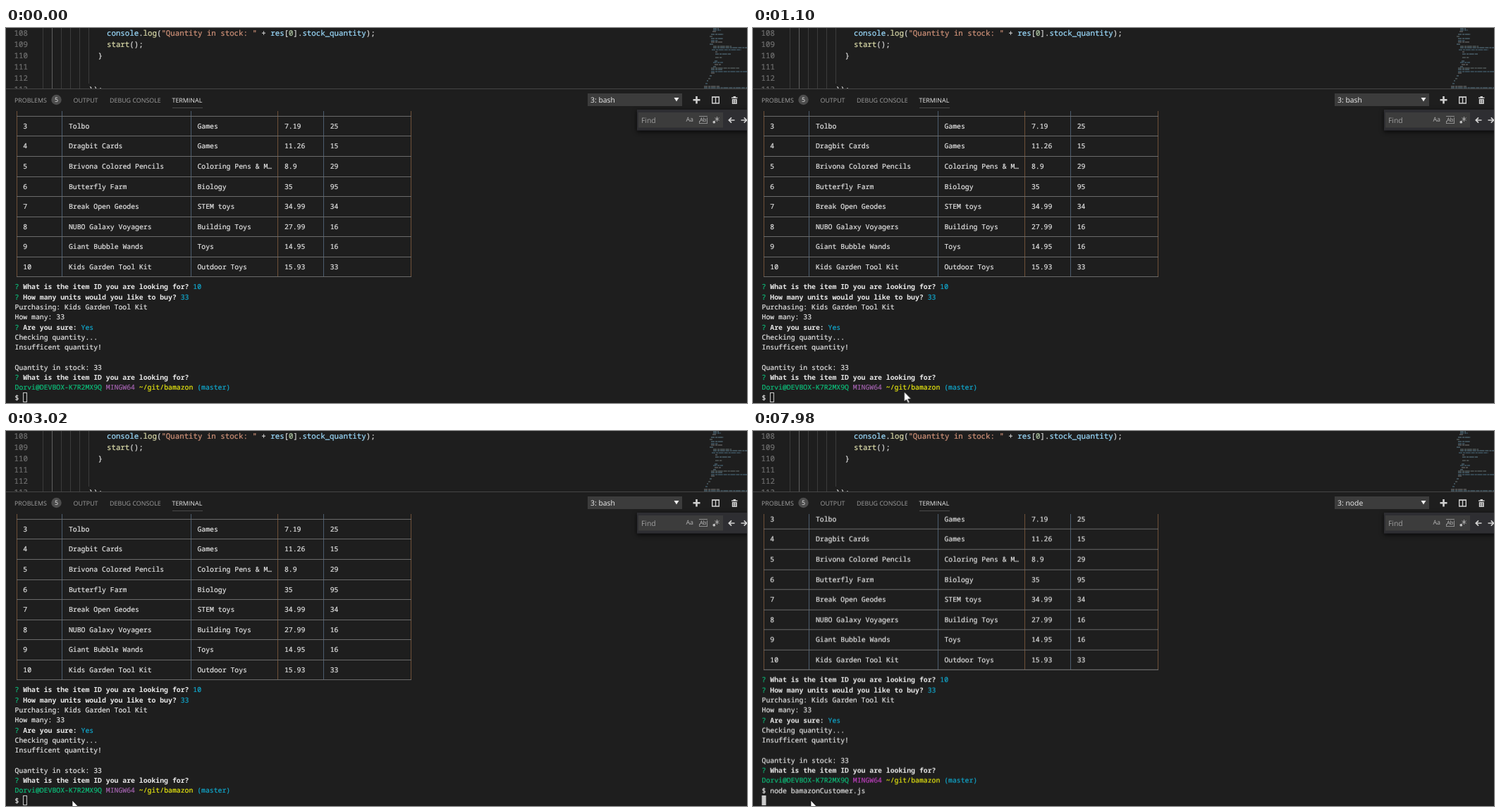
Animation of 1051 by 533 pixels, one loop 8 s. Source, as an HTML page:

```html
<!DOCTYPE html>
<html lang="en">
<head>
<meta charset="utf-8">
<title>Terminal session</title>
<style>
html, body { margin: 0; width: 100%; height: 100%; overflow: hidden; background: #1e1e1e; }
svg { display: block; width: 1051px; height: 533px; }
text { white-space: pre; text-rendering: geometricPrecision; }
.code, .term { fill: currentColor; }
.code text, .term text, .code tspan, .term tspan { fill: currentColor; stroke: currentColor; stroke-width: .22px; }
.code { font: 10.76px "Noto Sans Mono", "DejaVu Sans Mono", monospace; color: #d8d8d8; }
.term { font: 9.807px "Noto Sans Mono", "DejaVu Sans Mono", monospace; color: #e2e2e2; }
.tab { font: 8.9px "Open Sans", "Noto Sans", sans-serif; fill: #a0a0a0; }
.ui { font: 500 10.4px "Open Sans", "Noto Sans", sans-serif; fill: #f0f0f0; }
.dim { color: #707070; }
.var { color: #9cdcfe; }
.fn { color: #dcdcaa; }
.str { color: #ce9178; }
.num { color: #b5cea8; }
.green { color: #0dbc79; }
.cyan { color: #11a8cd; }
.yellow { color: #e5e510; }
.bold { font-weight: 700; color: #e8e8e8; }
.term .bold { stroke-width: 0; }
#table { shape-rendering: crispEdges; }
.shell { animation: shell 8s step-end infinite; }
.scroll { animation: scroll 8s step-end infinite; }
.typed { animation: typed 8s step-end infinite; }
.before { animation: before 8s step-end infinite; }
.after { animation: after 8s step-end infinite; }
.hollow { animation: hollow 8s step-end infinite; }
.block { animation: block 8s step-end infinite; }
.mouse { animation: mouse 8s step-end infinite; }
@keyframes shell { 0% { color: #a262ad; } 99.75%, 100% { color: #bc3fbc; } }
@keyframes scroll { 0% { transform: none; } 99.75%, 100% { transform: translateY(-14.286px); } }
@keyframes typed { 0% { opacity: 0; } 83.25%, 100% { opacity: 1; } }
@keyframes before { 0% { opacity: 1; } 99.75%, 100% { opacity: 0; } }
@keyframes after { 0% { opacity: 0; } 99.75%, 100% { opacity: 1; } }
@keyframes hollow { 0% { opacity: 1; } 41.75%, 100% { opacity: 0; } }
@keyframes block {
  0% { opacity: 0; transform: translateX(24.3px); }
  41.75% { opacity: 1; transform: translateX(24.3px); }
  83.25% { opacity: 1; transform: translateX(165.5px); }
  99.75%, 100% { opacity: 1; transform: translateX(12.5px); }
}
@keyframes mouse {
  0% { transform: translate(571px, 560px); }
  2.125% { transform: translate(571px, 528px); }
  2.875% { transform: translate(441px, 528px); }
  5.875% { transform: translate(380px, 522px); }
  6.875% { transform: translate(310px, 515px); }
  7.875% { transform: translate(258px, 511px); }
  10.75% { transform: translate(254px, 511px); }
  11.625% { transform: translate(241px, 513px); }
  12.75% { transform: translate(226px, 515px); }
  13.75% { transform: translate(214.5px, 517px); }
  17.625% { transform: translate(206px, 518px); }
  18.625% { transform: translate(196px, 520px); }
  19.625% { transform: translate(185px, 523px); }
  20.625% { transform: translate(177px, 525px); }
  22.375% { transform: translate(176px, 525px); }
  32.125% { transform: translate(161px, 525px); }
  32.875% { transform: translate(138px, 525px); }
  34% { transform: translate(116px, 525px); }
  36.75% { transform: translate(106px, 525px); }
  37.75% { transform: translate(94px, 525px); }
  38.875% { transform: translate(82px, 525px); }
  40.75% { transform: translate(82px, 514px); }
  41.75%, 100% { transform: translate(82px, 525px); }
}
</style>
</head>
<body>
<svg viewBox="0 0 1051 533" xmlns="http://www.w3.org/2000/svg">
  <defs>
    <clipPath id="editorClip"><rect width="1051" height="86"/></clipPath>
    <clipPath id="termClip"><rect y="118" width="1051" height="415"/></clipPath>
    <filter id="shadow" x="-10%" y="-40%" width="120%" height="200%">
      <feDropShadow dx="0" dy="2" stdDeviation="3" flood-color="#000" flood-opacity=".8"/>
    </filter>
  </defs>
  <rect width="1051" height="533" fill="#1e1e1e"/>

  <g clip-path="url(#editorClip)">
    <g id="guides"></g>
    <g id="code" class="code"></g>
    <g id="minimap" stroke-opacity=".5"></g>
  </g>

  <path d="M0 86.5H1051" stroke="#454545"/>
  <g class="tab">
    <text x="12" y="105.5">PROBLEMS</text>
    <circle cx="71.5" cy="102" r="7.2" fill="#4d4d4d"/>
    <text x="71.5" y="105.3" text-anchor="middle" fill="#eee">5</text>
    <text x="95.5" y="105.5">OUTPUT</text>
    <text x="147" y="105.5">DEBUG CONSOLE</text>
    <text x="235.5" y="105.5" fill="#ececec">TERMINAL</text>
  </g>
  <path d="M236 113.5H279" stroke="#4a4a4a"/>

  <rect x="825" y="93" width="134" height="18" fill="#3c3c3c"/>
  <text class="ui before" x="829" y="106.2">3: bash</text>
  <text class="ui after" x="829" y="106.2">3: node</text>
  <path d="M947.5 99H954.5L951 104.5Z" fill="#f0f0f0"/>
  <path d="M979.5 97V107.5M974.5 102.2H984.5" stroke="#d0d0d0" stroke-width="2.6"/>
  <path d="M1001.7 98H1011.3V107H1001.7ZM1006.5 98V107M1001 98.3H1012" fill="none" stroke="#d0d0d0" stroke-width="1.4"/>
  <path d="M1029 98.5H1037.5V100H1029ZM1031.5 97H1035V98.5H1031.5ZM1029.8 101H1036.8V108H1029.8Z" fill="#d0d0d0"/>
  <path d="M1032 102V107M1034.6 102V107" stroke="#1e1e1e" stroke-width=".7"/>

  <g clip-path="url(#termClip)">
    <g class="scroll">
      <g id="table"></g>
      <g id="lines" class="term"></g>
    </g>
    <rect class="hollow" x="24.5" y="518.5" width="5" height="13" fill="none" stroke="#c8c8c8"/>
    <rect class="block" y="518" width="6" height="14" fill="#cccccc"/>
  </g>

  <rect x="895" y="116" width="160" height="29.5" fill="#2d2d30" filter="url(#shadow)"/>
  <rect x="897" y="120" width="120" height="21.5" fill="#3c3c3c"/>
  <text x="901" y="135" class="ui" style="fill:#a0a0a0">Find</text>
  <g class="tab">
    <text x="964.5" y="133.3" fill="#b5b5b5">Aa</text>
    <text x="984" y="133.3" fill="#c5c5c5" font-size="7.6">Abl</text>
    <path d="M983 125.5H995M983 135.5H995M983.5 132V135.5M994.5 132V135.5" stroke="#a5a5a5" fill="none" stroke-width=".8"/>
    <path d="M1003 132.5H1005.5V135H1003ZM1008.5 126V133M1005.5 127.7L1011.5 131.3M1011.5 127.7L1005.5 131.3" fill="#c5c5c5" stroke="#c5c5c5" stroke-width=".8"/>
  </g>
  <path d="M1033.5 131H1025.5M1029 127.3L1025.3 131L1029 134.7M1042.5 131H1050M1046.8 127.3L1050.5 131L1046.8 134.7" fill="none" stroke="#d4d4d4" stroke-width="1.7"/>

  <path class="mouse" d="M0 0V14L3.1 11.2L5.3 16L7.5 15L5.3 10.3H9.8Z" fill="#fff" stroke="#111" stroke-width=".7"/>
</svg>
<script>
const CHAR = 5.884, LINE = 14.286, LEFT = 12.5, BOTTOM = 525;
const fill = (id, markup) => { document.getElementById(id).innerHTML = markup; };
const escapeText = s => s.replace(/&/g, '&amp;').replace(/</g, '&lt;');
const span = ([text, cls = '']) => `<tspan class="${cls}">${escapeText(text)}</tspan>`;
const textAt = (x, y, parts) => `<text xml:space="preserve" x="${x}" y="${y}">${parts.map(span).join('')}</text>`;
const stroke = (d, color, extra = '') => `<path d="${d}" stroke="${color}" ${extra}/>`;

// Editor
fill('guides', Array.from({ length: 6 }, (_, i) =>
  stroke(`M${52.5 + 13 * i} 0V${i === 5 ? 79 : 86}`, i === 1 ? '#606060' : '#3c3c3c')).join(''));

const source = [
  [143, [['console', 'var'], ['.'], ['log', 'fn'], ['('], ['"Quantity in stock: "', 'str'], [' + '],
    ['res', 'var'], ['['], ['0', 'num'], ['].'], ['stock_quantity', 'var'], [');']]],
  [143, [['start', 'fn'], ['();']]],
  [130.5, [['}']]],
  [0, []],
  [0, []],
  [117.5, [['});']]]
];
fill('code', source.map(([x, parts], i) => {
  const y = 10.8 + 16 * i;
  return textAt(11.5, y, [[String(108 + i), 'dim']]) + textAt(x, y, parts);
}).join(''));

// Minimap rows: x, y, width
const mini = [
  [1003, 1, 8], [1003, 3, 11], [1002, 5, 5], [1000, 9, 18], [998, 12, 4], [1000, 15, 17], [1000, 18, 10],
  [1000, 20, 16], [998, 23, 5], [1003, 26, 26], [1003, 28, 48], [1001, 31, 42], [1006, 34, 3], [1006, 37, 22],
  [1006, 42, 10], [1005, 47, 4], [1003, 49, 14], [1005, 52, 9], [1003, 55, 4], [1000, 57, 40], [1000, 59, 16],
  [1000, 62, 51], [1000, 64, 5], [998, 68, 3], [996, 72, 3], [994, 75, 2], [992, 79, 3], [990, 83, 22], [990, 85, 61]
];
const miniColors = ['#9cdcfe', '#7cc4ee', '#d4d4d4', '#9cdcfe', '#b0c8c8'];
fill('minimap', mini.map(([x, y, w], i) =>
  stroke(`M${x} ${y}h${w}`, miniColors[i % 5], 'stroke-dasharray="5 1 3 .7 7 1"')).join(''));

// Terminal: rows are counted upwards from the bottom line
const rowY = row => BOTTOM - LINE * row;
const put = (row, parts, col = 0) => textAt(LEFT + CHAR * col, rowY(row) + 3.6, parts);

const items = [
  ['3', 'Tolbo', 'Games', '7.19', '25'],
  ['4', 'Dragbit Cards', 'Games', '11.26', '15'],
  ['5', 'Brivona Colored Pencils', 'Coloring Pens & M…', '8.9', '29'],
  ['6', 'Butterfly Farm', 'Biology', '35', '95'],
  ['7', 'Break Open Geodes', 'STEM toys', '34.99', '34'],
  ['8', 'NUBO Galaxy Voyagers', 'Building Toys', '27.99', '16'],
  ['9', 'Giant Bubble Wands', 'Toys', '14.95', '16'],
  ['10', 'Kids Garden Tool Kit', 'Outdoor Toys', '15.93', '33']
];
const borders = [0, 11, 42, 63, 74, 95];
const borderX = col => LEFT + CHAR * (col + .5) - .3;
const ruleY = row => rowY(row) + .32;
const warm = '#6e5039', cool = '#4c5d6e';
const rules = Array.from({ length: items.length + 1 }, (_, i) =>
  stroke(`M15 ${ruleY(28 - 2 * i)}H574.5`, '#6a6a6a'));
const columns = borders.map((col, i) =>
  stroke(`M${borderX(col)} 100V${ruleY(12)}`, [0, 3, 5].includes(i) ? warm : cool));
fill('table', columns.concat(rules).join(''));

const ask = (question, answer = '') => [['? ', 'green'], [question + ' ', 'bold'], [answer, 'cyan']];
const session = [
  ask('What is the item ID you are looking for?', '10'),
  ask('How many units would you like to buy?', '33'),
  [['Purchasing: Kids Garden Tool Kit']],
  [['How many: 33']],
  ask('Are you sure:', 'Yes'),
  [['Checking quantity...']],
  [['Insufficent quantity!']],
  [],
  [['Quantity in stock: 33']],
  ask('What is the item ID you are looking for?'),
  [['Dorvi@DEVBOX-K7R2MX9Q ', 'green'], ['MINGW64 ', 'shell'], ['~/git/bamazon ', 'yellow'], ['(master)', 'cyan']],
  [['$ ']]
];
const cells = items.flatMap((item, i) => item.map((value, c) => put(27 - 2 * i, [[value]], borders[c] + 2)));
const log = session.map((parts, i) => put(11 - i, parts));
const command = `<g class="typed">${put(0, [['node bamazonCustomer.js']], 2)}</g>`;
fill('lines', cells.concat(log, command).join(''));
</script>
</body>
</html>
```
